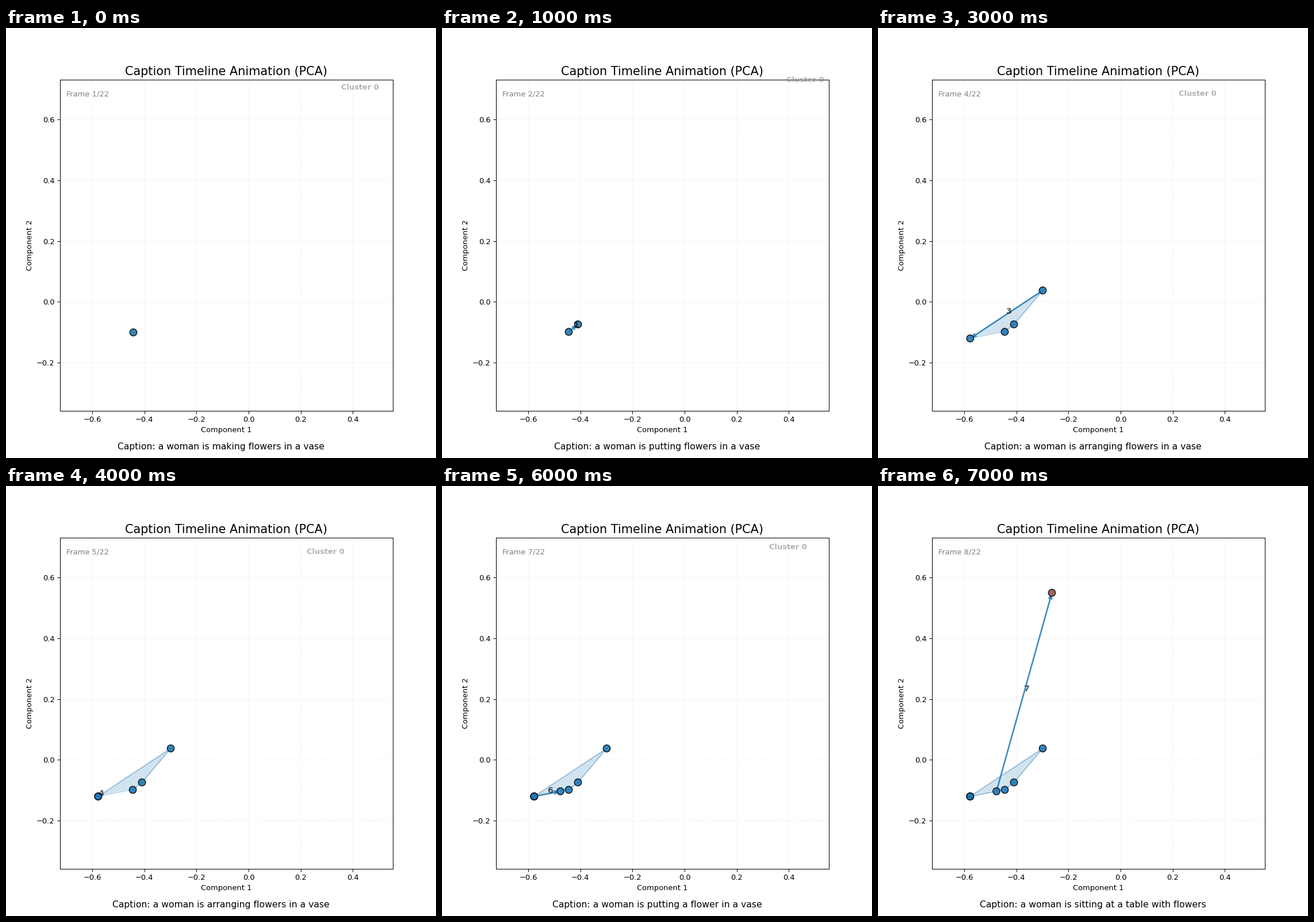
Write a matplotlib script that moves like this. It is 748x748 px and loops after 8 s.

```python
import matplotlib.pyplot as plt
from matplotlib.animation import FuncAnimation

SIZE = 748
BLUE, BROWN = "tab:blue", "tab:brown"
TOTAL = 22

REST = (-0.5777, -0.1213)
POINTS = [(-0.4448, -0.0995), (-0.4095, -0.0749), (-0.2991, 0.0370),
          REST, REST, REST, (-0.4768, -0.1043), (-0.2638, 0.5501)]
COLORS = [BLUE] * 7 + [BROWN]

ARRANGING = "arranging flowers in a vase"
ACTIONS = ["making flowers in a vase", "putting flowers in a vase",
           "holding a flower in her hand", ARRANGING, ARRANGING, ARRANGING,
           "putting a flower in a vase", "sitting at a table with flowers"]

# Cluster label: centre x and baseline y in pixels from the top left
TAG_HOME = (555.8, 118)
TAGS = [(615.8, 107), (631.8, 94), (681.8, 35),
        TAG_HOME, TAG_HOME, TAG_HOME, (601.8, 110), None]

fig, ax = plt.subplots(figsize=(8, 8), dpi=SIZE / 8)
ax.set_xlim(-0.7252, 0.5545)
ax.set_ylim(-0.3596, 0.7322)
ax.set_title("Caption Timeline Animation (PCA)", fontsize=16)
ax.set_xlabel("Component 1")
ax.set_ylabel("Component 2")
ax.grid(True, linestyle=":", alpha=0.3)

counter = ax.text(0.02, 0.95, "", transform=ax.transAxes, fontsize=10, color="gray")
caption = fig.text(0.5, 0.02, "", ha="center", fontsize=12)
tag = fig.text(0, 0, "Cluster 0", transform=None, ha="center", fontsize=10,
               fontweight="bold", color="gray", alpha=0.6)
drawn = []


def draw_hull(step):
    corners = POINTS[:min(step + 1, 4)]
    if len(corners) > 2:
        drawn.extend(ax.fill(*zip(*corners), color=BLUE, alpha=0.2, lw=1, zorder=1))


def draw_trail(step):
    for a, b in zip(POINTS[:step], POINTS[1:step]):
        if a != b:
            drawn.extend(ax.plot(*zip(a, b), color=BLUE, alpha=0.45, lw=1, zorder=2))


def draw_move(step):
    a, b = POINTS[step - 1], POINTS[step]
    if a != b:
        drawn.append(ax.annotate("", xy=b, xytext=a, zorder=3, arrowprops=dict(
            arrowstyle="->", color=COLORS[step - 1], lw=2, alpha=0.85)))
    drawn.append(ax.text((a[0] + b[0]) / 2 + 0.01, (a[1] + b[1]) / 2 + 0.01, str(step),
                         ha="center", va="center", fontsize=11, fontweight="bold",
                         color="black", alpha=0.65, zorder=5))


def draw(step):
    while drawn:
        drawn.pop().remove()
    draw_hull(step)
    if step:
        draw_trail(step)
        draw_move(step)
    drawn.append(ax.scatter(*zip(*POINTS[:step + 1]), s=90, c=COLORS[:step + 1],
                            edgecolors="black", linewidths=1.1, alpha=0.9, zorder=4))
    counter.set_text(f"Frame {step + 1}/{TOTAL}")
    caption.set_text(f"Caption: a woman is {ACTIONS[step]}")
    spot = TAGS[step]
    tag.set_visible(spot is not None)
    if spot:
        tag.set_position((spot[0], SIZE - spot[1]))
    return drawn


anim = FuncAnimation(fig, draw, frames=len(POINTS), interval=1000,
                     init_func=lambda: draw(0), repeat=True, repeat_delay=0)
plt.show()
```
